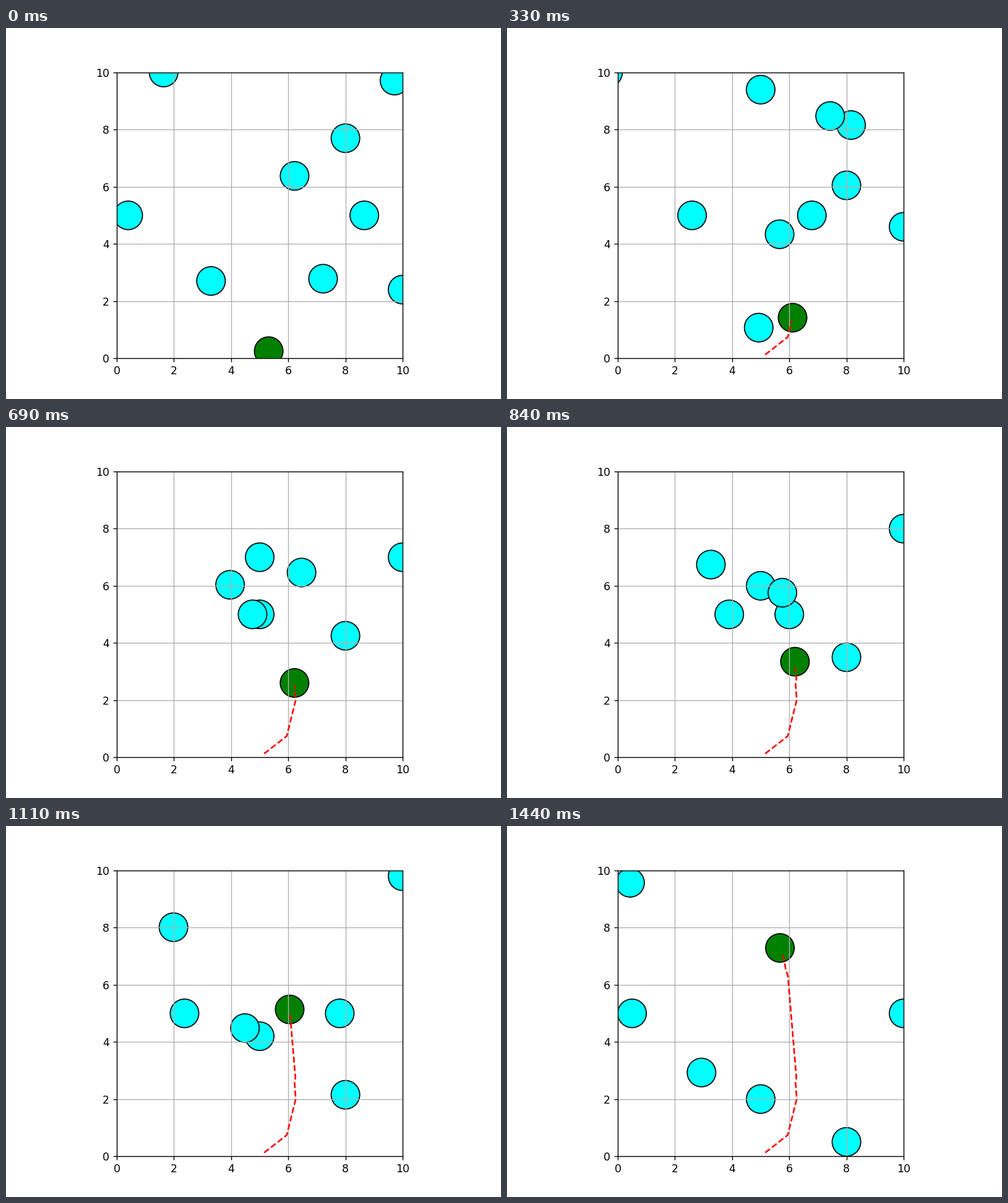
A matplotlib script for the animation above (1.47 s loop, 800 by 600 pixels).

```python
import numpy as np
import matplotlib.pyplot as plt
from matplotlib.animation import FuncAnimation
from matplotlib.patches import Circle

FRAMES = 49
INTERVAL = 30
FIRST_STEP = 2  # the simulation is already two steps in when the loop opens
RADIUS = 0.5

# Obstacles move in straight lines: start x, start y, speed per step, heading
OBSTACLES = [
    (0, 5, 0.20, 0),
    (9, 5, 0.17, 180),
    (8, 8, 0.15, -90),
    (10, 2, 0.20, 90),
    (5, 12, 0.20, -90),
    (2, 10, 0.18, 180),
    (3, 3, 0.21, -45),
    (7.5, 2.5, 0.20, 135),
    (10, 10, 0.20, -135),
    (6, 6, 0.22, 60),
]

# The robot steers from (5, 0): steps, speed per step, heading
LEGS = [
    (6, 0.2, 38),
    (13, 0.1, 76),
    (6, 0.1, 94),
    (2, 0.075, 78),
    (18, 0.2, 94.8),
    (1, 0.2, 110),
    (2, 0.2, 100),
    (2, 0.2, 110),
]


def velocity(speed, heading):
    angle = np.radians(heading)
    return speed * np.array([np.cos(angle), np.sin(angle)])


def robot_path():
    moves = [velocity(speed, heading)
             for steps, speed, heading in LEGS for _ in range(steps)]
    return np.cumsum([(5, 0), *moves], axis=0)


def add_disc(color):
    return ax.add_patch(Circle((0, 0), RADIUS, fc=color, ec="black"))


fig, ax = plt.subplots(figsize=(6.4, 4.8), dpi=125)
ax.set_aspect("equal")
ax.set_xlim(0, 10)
ax.set_ylim(0, 10)
ax.grid(True)

path = robot_path()
discs = [add_disc("cyan") for _ in OBSTACLES]
robot = add_disc("green")
trail, = ax.plot([], [], "r--")


def update(frame):
    step = frame + FIRST_STEP
    for disc, (x, y, speed, heading) in zip(discs, OBSTACLES):
        disc.center = (x, y) + step * velocity(speed, heading)
    robot.center = path[step]
    # The trail ends one step behind the robot
    trail.set_data(*path[1:step].T)
    return [*discs, robot, trail]


anim = FuncAnimation(fig, update, frames=FRAMES, interval=INTERVAL,
                     repeat=True, repeat_delay=0)
plt.show()
```
